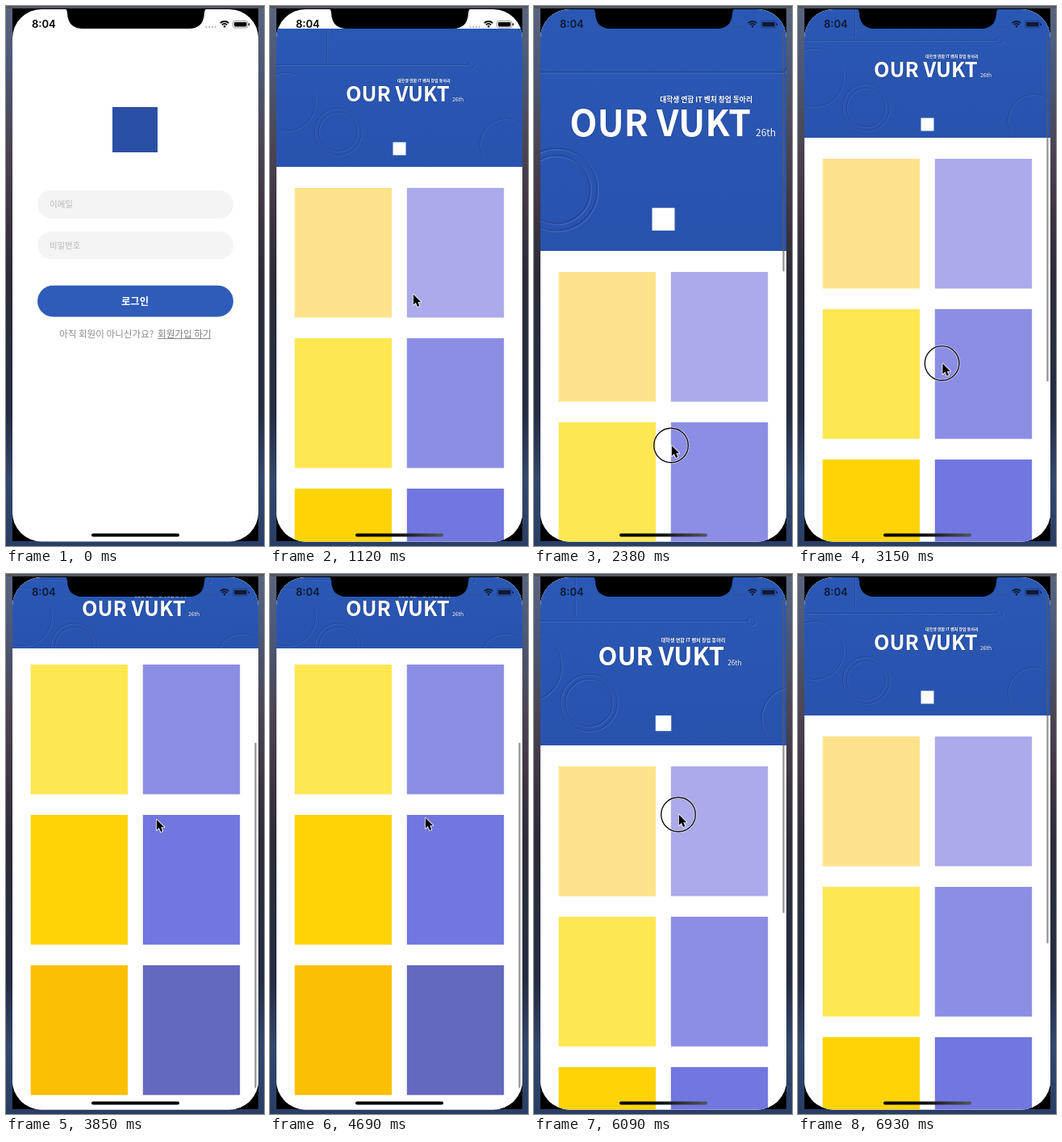
Write an HTML page with a canvas that moves like this. It is 320 px wide and 668 px high and loops after 7000 ms.

```html
<!DOCTYPE html>
<html lang="ko">
<head>
<meta charset="utf-8">
<style>
  html, body { margin: 0; width: 320px; height: 668px; overflow: hidden; background: #2e3346; }
  canvas { display: block; }
</style>
</head>
<body>
<canvas id="stage" width="320" height="668"></canvas>
<script>
const ctx = document.getElementById('stage').getContext('2d');
const LOOP = 7000;
const KOREAN = '"Noto Sans CJK KR", "Noto Sans CJK", sans-serif';
const TOP = 4, HEAD = 171, FIRST_ROW = 200.5;
const CARDS = [['#fce28c', '#abaaea'], ['#fee751', '#8c8ee5'], ['#fed406', '#7177de'], ['#fcbf03', '#6468be']];

const ease = {
  linear: k => k,
  smooth: k => k * k * (3 - 2 * k),
  out: k => 1 - (1 - k) ** 3
};

// time, pointer x, pointer y, scroll offset, easing towards this row
const TRACK = [
  [300, 250, 560, 0],
  [650, 177, 356, 0, 'smooth'],
  [1200, 177, 356, 0, 'linear'],
  [1600, 175, 254, 0, 'smooth'],
  [2380, 170, 543, 128.5, 'smooth'],
  [2480, 170, 543, 128.5, 'linear'],
  [2900, 175, 480, 0, 'out'],
  [3100, 178, 453, 0, 'smooth'],
  [3400, 186, 303, -150, 'smooth'],
  [3850, 186, 303, -275, 'out'],
  [4350, 186, 303, -275, 'linear'],
  [4700, 192, 301, -275, 'smooth'],
  [5000, 198, 456, -120, 'smooth'],
  [5250, 198, 456, -11.5, 'out'],
  [5450, 192, 360, 0, 'out'],
  [5650, 179, 225, 0, 'smooth'],
  [6090, 179, 297, 37.5, 'smooth'],
  [6200, 179, 297, 37.5, 'linear'],
  [6600, 345, 400, 0, 'out']
];
const PRESSES = [[700, 810], [1600, 2480], [3100, 3400], [4700, 5000], [5650, 6200]];

function pose(t) {
  const i = TRACK.findIndex(row => row[0] > t);
  if (i === 0) return [340, 560, 0];
  if (i < 0) return TRACK.at(-1).slice(1, 4);
  const a = TRACK[i - 1], b = TRACK[i];
  const k = ease[b[4]]((t - a[0]) / (b[0] - a[0]));
  return [1, 2, 3].map(n => a[n] + (b[n] - a[n]) * k);
}

// Critically damped slide of the presented page
function slide(t) {
  if (t < 840) return 668;
  const x = (t - 840) * 0.01826;
  return t > 1500 ? 0 : Math.round(664 * (1 + x) * Math.exp(-x));
}

function gradient(x0, y0, x1, y1, ...stops) {
  const g = ctx.createLinearGradient(x0, y0, x1, y1);
  stops.forEach((c, i) => g.addColorStop(i / (stops.length - 1), c));
  return g;
}

function rect(x, y, w, h, fill, r = 0) {
  ctx.beginPath();
  ctx.roundRect(x, y, w, h, r);
  ctx.fillStyle = fill;
  ctx.fill();
}

function text(s, x, y, font, fill, align = 'left') {
  ctx.font = font;
  ctx.fillStyle = fill;
  ctx.textAlign = align;
  ctx.textBaseline = 'middle';
  ctx.fillText(s, x, y);
}

function drawLogin() {
  rect(8, 4, 305, 660, '#fff');
  rect(132, 125, 56, 56, '#2a50a5');
  rect(39, 228, 243, 35, '#f4f4f4', 17.5);
  rect(39, 279, 243, 34, '#f4f4f4', 17);
  text('이메일', 54, 245, '10.5px ' + KOREAN, '#b8b8b8');
  text('비밀번호', 54, 296, '10.4px ' + KOREAN, '#b8b8b8');
  rect(39, 345.8, 243, 38.6, '#2f5cb9', 19.3);
  text('로그인', 160, 365, 'bold 12.3px ' + KOREAN, '#fff', 'center');
  text('아직 회원이 아니신가요?', 66, 405.5, '11.6px ' + KOREAN, '#8c8c8c');
  text('회원가입 하기', 188, 405.5, '11.6px ' + KOREAN, '#7c7c7c');
  rect(188, 411, 66, 1, '#8c8c8c');
}

function emboss(draw) {
  for (const [shift, color] of [[0.8, 'rgba(90,135,215,.35)'], [0, 'rgba(20,50,120,.4)']]) {
    ctx.save();
    ctx.translate(shift, shift);
    ctx.beginPath();
    draw();
    ctx.strokeStyle = color;
    ctx.lineWidth = 1;
    ctx.stroke();
    ctx.restore();
  }
}

function drawBanner(bottom) {
  const height = bottom - TOP, scale = Math.max(1, height / HEAD);
  ctx.save();
  ctx.beginPath();
  ctx.rect(8, TOP, 305, height);
  ctx.clip();
  rect(8, TOP, 305, height, gradient(0, TOP, 0, bottom, '#2a58b4', '#2853ad'));
  ctx.translate(160.5, TOP + height / 2);
  ctx.scale(scale, scale);
  emboss(() => {
    ctx.moveTo(-152, -41);
    ctx.lineTo(86, -41);
    ctx.moveTo(-90, -86);
    ctx.lineTo(-90, -46);
    for (const [x, y, r] of [[90, -41, 4], [-76, 42, 29], [-76, 42, 24], [-140, 5, 36], [132, 58, 32]]) {
      ctx.moveTo(x + r, y);
      ctx.arc(x, y, r, 0, 7);
    }
  });
  ctx.shadowColor = 'rgba(10,30,90,.6)';
  ctx.shadowBlur = 2;
  text('대학생 연합 IT 벤처 창업 동아리', -2.5, -21.8, 'bold 5px ' + KOREAN, '#fff');
  text('OUR VUKT', -66.5, -5.5, 'bold 25.4px ' + KOREAN, '#fff');
  text('26th', 65.5, 1.5, '500 6.8px ' + KOREAN, '#fff');
  ctx.shadowBlur = 0;
  rect(-8, 55, 16, 16, '#fff');
  ctx.restore();
}

function drawGallery(scroll, showBar) {
  rect(8, TOP, 305, 668, '#fff');
  const first = Math.round(FIRST_ROW + scroll);
  CARDS.forEach((row, i) => row.forEach((color, j) =>
    rect(30.6 + j * 139.2, first + i * 186, 120.4, 160.4, color)));
  drawBanner(Math.max(92, first - 26));
  if (showBar) {
    const start = 30 - 0.65 * Math.min(0, scroll);
    rect(308.5, start, 2, 427 - Math.max(0, scroll), 'rgba(90,90,95,.7)', 1);
  }
}

function drawStatus(color, home) {
  text('8:04', 32, 23, '600 13px Inter, sans-serif', color);
  for (let i = 0; i < 4; i++) rect(247.5 + i * 3.7, 25, 2, 2, 'rgba(60,70,95,.45)', 1);
  ctx.strokeStyle = color;
  ctx.lineWidth = 1.8;
  for (const r of [4.5, 7.5]) {
    ctx.beginPath();
    ctx.arc(271, 26.5, r, -2.35, -0.79);
    ctx.stroke();
  }
  rect(269.8, 23.8, 2.5, 2.8, color, 1.2);
  ctx.lineWidth = 0.8;
  ctx.globalAlpha = 0.5;
  ctx.beginPath();
  ctx.roundRect(281.5, 18.5, 18.5, 8.5, 2.5);
  ctx.stroke();
  ctx.globalAlpha = 1;
  rect(283, 20, 15.5, 5.5, color, 1.4);
  rect(300.7, 21.2, 1.3, 3, color, 0.6);
  rect(106, 652.5, 109, 4, home, 2);
}

function drawNotch() {
  ctx.beginPath();
  ctx.moveTo(71, 3);
  ctx.quadraticCurveTo(76, 3, 76, 9);
  ctx.quadraticCurveTo(77, 28, 95, 28);
  ctx.lineTo(227, 28);
  ctx.quadraticCurveTo(245, 28, 246, 9);
  ctx.quadraticCurveTo(246, 3, 251, 3);
  ctx.fillStyle = '#000';
  ctx.fill();
}

const ARROW = new Path2D('M0 0V15.5L3.6 12.2L6.2 18L9 16.8L6.5 11.2H11.3Z');

function drawPointer(x, y, pressed) {
  if (pressed) {
    for (const [width, color] of [[3, 'rgba(255,255,255,.6)'], [1.4, '#111']]) {
      ctx.beginPath();
      ctx.arc(x, y + 0.5, 21.3, 0, 7);
      ctx.lineWidth = width;
      ctx.strokeStyle = color;
      ctx.stroke();
    }
  }
  ctx.save();
  ctx.translate(x + 0.8, y + 0.8);
  ctx.scale(0.84, 0.84);
  ctx.lineWidth = 2;
  ctx.lineJoin = 'round';
  ctx.strokeStyle = '#fff';
  ctx.stroke(ARROW);
  ctx.fillStyle = '#000';
  ctx.fill(ARROW);
  ctx.restore();
}

function render(t) {
  const [x, y, scroll] = pose(t);
  const offset = slide(t);

  rect(0, 0, 320, 668, gradient(0, 0, 0, 668,
    '#59647e', '#4b5674', '#4c4654', '#3e3643', '#2d2b38', '#292d3d', '#232c42', '#34466b', '#293d66'));
  rect(0, 0, 320, 3, '#555860');
  rect(8, 3, 305, 659, '#000');

  ctx.save();
  ctx.beginPath();
  ctx.roundRect(8, 4, 305, 658.5, 36);
  ctx.clip();
  drawLogin();
  if (offset < 664) {
    ctx.translate(0, offset);
    drawGallery(scroll, t >= 1600);
    ctx.translate(0, -offset);
  }
  const overCards = offset < 40 && scroll > -50;
  drawStatus(offset < 14 ? '#101a33' : '#000',
    overCards ? gradient(106, 0, 215, 0, '#000', '#111', '#55565f') : '#000');
  ctx.restore();

  drawNotch();
  if (t >= 300 && t < 6600) drawPointer(x, y, PRESSES.some(([a, b]) => t >= a && t < b));
}

const started = performance.now();
function tick() {
  render((performance.now() - started) % LOOP);
  requestAnimationFrame(tick);
}
tick();
</script>
</body>
</html>
```
